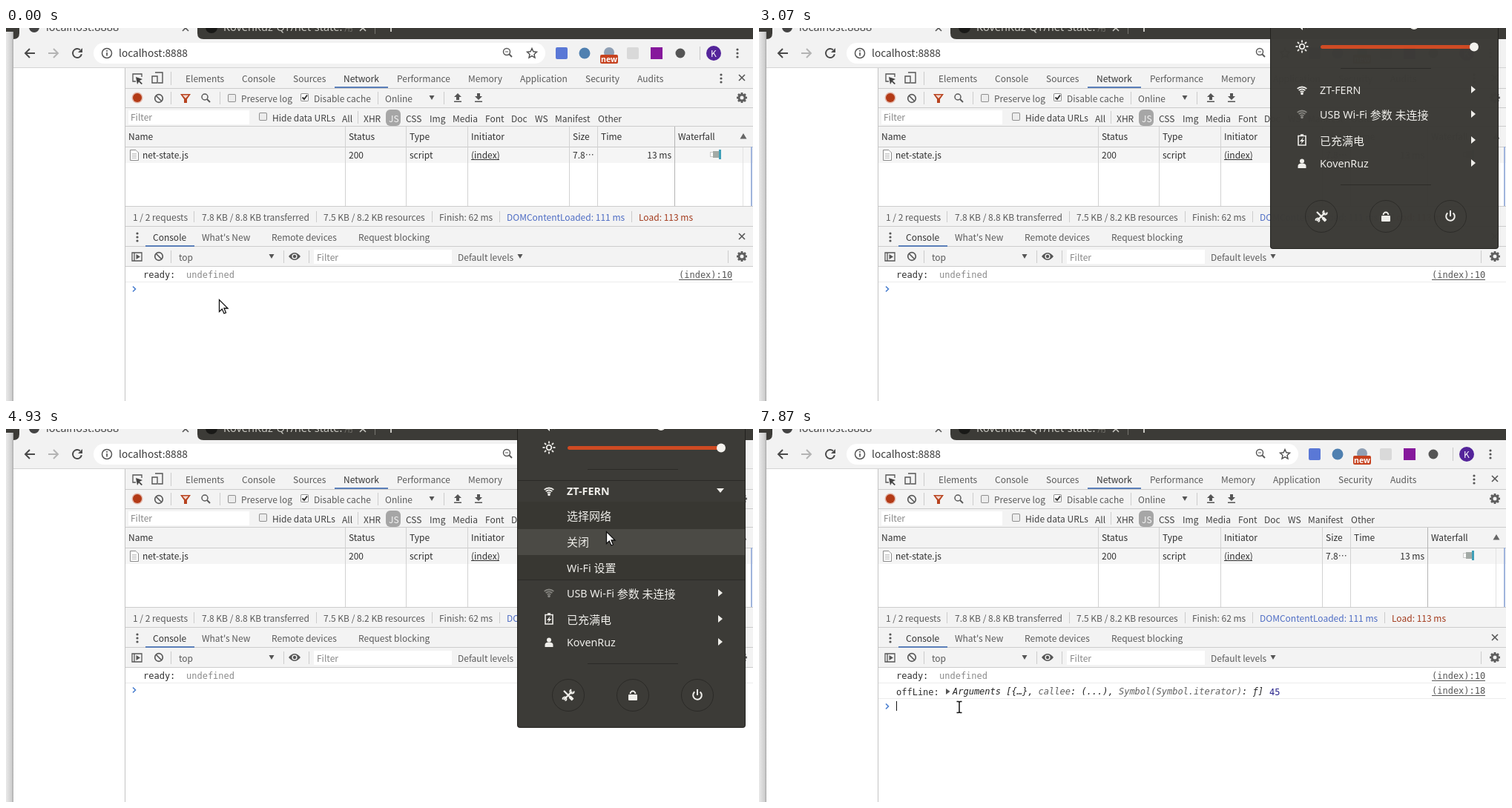
Animation of 1007 by 503 pixels, one loop 8 s. Source, as an HTML page with a canvas:

```html
<!DOCTYPE html>
<html lang="en">
<head>
<meta charset="utf-8">
<title>Network panel</title>
<style>
html, body { margin: 0; width: 100%; height: 100%; overflow: hidden; background: #fff; }
canvas { display: block; }
</style>
</head>
<body>
<canvas id="stage" width="1007" height="503"></canvas>
<script>
const W = 1007, H = 503, LOOP = 8000, TICK = 200 / 3;
const screen = document.getElementById('stage').getContext('2d');
const layer = Object.assign(document.createElement('canvas'), { width: W, height: H });
const menuCtx = layer.getContext('2d');
let c = screen;

const UI = '12px "Noto Sans CJK SC", "Noto Sans CJK JP", "Noto Sans", sans-serif';
const MONO = '12px "DejaVu Sans Mono", monospace';
const CHAR = 7.224;
const GREY = '#5a5a5a', INK = '#303030', BAR = '#f3f3f3', RULE = '#cccccc', DARK = '#3c3b37';
const USER = 'KovenRuz', WIFI = 'ZT-FERN';

// ---- drawing helpers ----
function rect(color, x, y, w, h, r = 0) {
  c.fillStyle = color;
  c.beginPath();
  c.roundRect(x, y, w, h, r);
  c.fill();
}
function disc(color, x, y, r) {
  c.fillStyle = color;
  c.beginPath();
  c.arc(x, y, r, 0, 7);
  c.fill();
}
function ring(color, x, y, r, w = 1.5, from = 0, to = Math.PI * 2) {
  c.strokeStyle = color;
  c.lineWidth = w;
  c.beginPath();
  c.arc(x, y, r, from, to);
  c.stroke();
}
function at(x, y, draw) {
  c.save();
  c.translate(x, y);
  draw();
  c.restore();
}
function fill(color, d, x = 0, y = 0) {
  at(x, y, () => { c.fillStyle = color; c.fill(new Path2D(d)); });
}
function stroke(color, w, d, x = 0, y = 0) {
  at(x, y, () => { c.strokeStyle = color; c.lineWidth = w; c.stroke(new Path2D(d)); });
}
function text(s, x, y, color = GREY, font = UI, align = 'left') {
  c.font = font;
  c.fillStyle = color;
  c.textAlign = align;
  c.fillText(s, x, y);
}
const hline = (y, x = 161, color = RULE) => rect(color, x, y, W - x, 1);
const vline = (x, y, h, color = RULE) => rect(color, x, y, 1, h);

// ---- icons ----
function gear(x, y) {
  ring('#5f5f5f', x, y, 4, 3);
  for (let i = 0; i < 8; i++) at(x, y, () => {
    c.rotate(i * Math.PI / 4);
    rect('#5f5f5f', -1.4, -7, 2.8, 3);
  });
}
function dots(x, y) {
  for (const d of [-5, 0, 5]) disc('#555', x, y + d, 1.6);
}
const cross = (x, y, r = 4, color = '#555') =>
  stroke(color, 1.6, `M${-r} ${-r}L${r} ${r}M${r} ${-r}L${-r} ${r}`, x, y);
const drop = (x, y) => fill('#555', 'M-3.5-3H3.5L0 3Z', x, y);
function lens(x, y, r = 4) {
  ring('#5a5a5a', x - 1, y - 1, r);
  stroke('#5a5a5a', 2, 'M2 2L6 6', x, y);
}
function forbid(x, y) {
  ring('#5a5a5a', x, y, 5.3, 1.7);
  stroke('#5a5a5a', 1.7, 'M-4-4L4 4', x, y);
}
function checkbox(x, y, on) {
  rect('#8f8f8f', x, y, 11, 11, 2);
  rect(on ? '#fff' : '#ececec', x + 1, y + 1, 9, 9, 1);
  if (on) stroke('#333', 2, 'M2.5 5.5L5 8L9 2.5', x, y);
}

// ---- browser window ----
function chrome() {
  rect('#fff', 0, 0, W, H);
  const shade = c.createLinearGradient(0, 0, 10, 0);
  shade.addColorStop(0, '#e9e9e9');
  shade.addColorStop(0.75, '#cfcfcf');
  shade.addColorStop(1, '#a9a9a9');
  rect(shade, 0, 0, 10, H);
  rect(DARK, 0, 0, 10, 5);
  rect('#f2f2f2', 10, 0, W - 10, 53);
  fill(DARK, 'M10 0H18V7Q18 15 10 15Z');
  fill(DARK, 'M258 0H1007V15H266Q258 15 258 7Z');
  hline(53, 10, '#d4d4d4');

  const tabFont = '14.5px "Noto Sans", sans-serif';
  disc('#444', 38, -1, 7);
  text('localhost:8888', 54, 4, '#444', tabFont);
  cross(242, 0);
  disc('#191917', 277, -1, 8);
  text(USER + '-QT/net-state:', 293, 4, '#c9c8c2', tabFont);
  text('用', 456, 4, '#77766f', UI);
  cross(481, 0, 4, '#c9c8c2');
  vline(497, 0, 8, '#77766f');
  rect('#c9c8c2', 518, 0, 2, 5);

  rect('#fff', 118, 20, 609, 28, 14);
  stroke('#4a4a4a', 2, 'M7 0H-6M0-6L-6 0L0 6', 32, 34);
  stroke('#b4b4b4', 2, 'M-7 0H6M0-6L6 0L0 6', 64, 34);
  ring('#4a4a4a', 96, 34, 6, 2, 0.2, 5.4);
  fill('#4a4a4a', 'M7-7V-1H1Z', 96, 34);
  ring('#555', 136, 34, 6.5);
  rect('#555', 135.2, 33, 1.7, 4.5);
  rect('#555', 135.2, 30, 1.7, 1.8);
  text('localhost:8888', 152, 38.5, '#3a3a3a', UI.replace('12px', '13.7px'));
  lens(676, 33, 4.5);
  rect('#5a5a5a', 673, 31.5, 4, 1);
  stroke('#4f4f4f', 1.4, 'M0-6.5L1.9-2.2L6.5-1.8L3 1.4L4 6L0 3.6L-4 6L-3-1.4L-6.5-1.8L-1.9-2.2Z'.replace('-3-1.4', '-3 1.4'), 709, 34);

  rect('#5a78d6', 741, 26, 16, 16, 2);
  disc('#4f80b0', 780, 34, 7.5);
  disc('#8f9fb4', 813, 33, 7);
  rect('#c6421f', 801, 36, 24, 12, 2);
  text('new', 813, 45.5, '#fff', 'bold 10.5px "Noto Sans", sans-serif', 'center');
  rect('#d9d9d9', 837, 26, 16, 16, 2);
  rect('#86189c', 869, 26, 16, 16);
  disc('#555', 909, 34, 6.5);
  vline(935, 25, 18, '#c8c8c8');
  disc('#54249a', 954, 34, 10);
  text(USER[0], 954, 38.5, '#fff', UI, 'center');
  dots(986, 34);
}

// ---- developer tools ----
function labels(y, items, color) {
  for (const [s, x] of items) text(s, x, y, color);
}
function toolbars() {
  vline(160, 54, H - 54, '#c4c4c4');
  rect(BAR, 161, 54, W - 161, 107);
  for (const y of [81, 107, 132, 160]) hline(y);

  stroke('#555', 1.3, 'M-2 4H-6V-6H6V-2', 177, 68);
  fill('#444', 'M-2-2L7 1L3 3L7 7L5.5 8L2 4.5L0 8Z', 177, 68);
  stroke('#555', 1.4, 'M-3-7H7V7H1M-7-2H0V7H-7Z', 204, 67);
  vline(222, 59, 18);
  labels(73, [['Elements', 242], ['Console', 318], ['Sources', 387], ['Performance', 527],
    ['Memory', 623], ['Application', 693], ['Security', 781], ['Audits', 851]]);
  text('Network', 455, 73, '#333');
  rect('#5b7fb9', 443, 79, 72, 2);
  dots(964, 68);
  cross(992, 67);

  disc('#e3b8ac', 177, 94, 7.5);
  disc('#b33a16', 177, 94, 6);
  forbid(206, 95);
  for (const x of [222, 288, 501, 590]) vline(x, 86, 17);
  fill('#b8431f', 'M-7-6H7L2 1V6H-2V1Z', 242, 95);
  fill('#f3d8cf', 'M-4-4.500H4L0 0Z', 242, 95);
  lens(269, 94);
  checkbox(299, 89);
  text('Preserve log', 317, 99.5);
  checkbox(397, 88, true);
  text('Disable cache', 415, 99.5);
  text('Online', 511, 99.5);
  drop(574, 94);
  fill('#555', 'M0-6L5-1H2V3H-2V-1H-5ZM-5 4.5H5V6H-5Z', 609, 94);
  fill('#555', 'M0 3L5-2H2V-6H-2V-2H-5ZM-5 4.5H5V6H-5Z', 637, 94);
  gear(992, 94);

  rect('#fff', 165, 111, 163, 19);
  text('Filter', 168, 125, '#868686');
  checkbox(341, 114);
  rect('#a6a6a6', 512, 110, 20, 22, 6);
  vline(474, 112, 17);
  labels(126.5, [['All', 453], ['XHR', 482], ['CSS', 539], ['Img', 571], ['Media', 602],
    ['Font', 646], ['Doc', 681], ['WS', 713], ['Manifest', 740], ['Other', 798]], '#404040');
  text('Hide data URLs', 359, 125.5, '#404040');
  text('JS', 516, 126.5, '#f4f4f4');
}
function requests() {
  labels(151, [['Name', 165], ['Status', 462], ['Type', 544], ['Initiator', 627],
    ['Size', 764], ['Time', 802], ['Waterfall', 906]], INK);
  fill('#666', 'M-4.500 3.500H4.500L0-4Z', 994, 146);
  rect('#f5f5f5', 161, 161, W - 161, 21);
  for (const x of [457, 539, 622, 759, 797, 901]) vline(x, 133, 107, x > 900 ? '#b4b4b4' : '#d2d2d2');
  vline(993, 161, 79, '#e2e2e2');
  rect('#9fb4dc', 1004, 160, 2, 80);

  rect('#fff', 167.5, 164.5, 11, 14, 1);
  stroke('#8c8c8c', 1, 'M.5.5H8L11.5 4V14.5H.5Z', 167, 164);
  stroke('#c0c0c0', 1, 'M3 5.500H9M3 7.500H9M3 9.500H9M3 11.500H9', 167, 164);
  labels(175.5, [['net-state.js', 184], ['200', 462], ['script', 544], ['(index)', 627], ['7.8⋯', 764]], INK);
  rect(INK, 627, 177, 38, 1);
  text('13 ms', 897, 175.5, INK, UI, 'right');
  rect('#c9c9c9', 949, 167, 9, 7);
  rect('#fff', 950, 168, 3, 5);
  rect('#a3aaa6', 953, 166, 8, 9);
  rect('#3f9fb8', 961, 164, 3, 13);

  rect(BAR, 161, 240, W - 161, 81);
  for (const y of [240, 267, 294, 321]) hline(y);
  labels(260, [['1 / 2 requests', 171], ['7.8 KB / 8.8 KB transferred', 264],
    ['7.5 KB / 8.2 KB resources', 428], ['Finish: 62 ms', 584]]);
  text('DOMContentLoaded: 111 ms', 675, 260, '#4d6cc4');
  text('Load: 113 ms', 853, 260, '#a33a1c');
  for (const x of [253, 418, 574, 665, 843]) vline(x, 247, 15);
}
function drawer(t) {
  dots(177, 282);
  text('Console', 198, 287, '#333');
  rect('#5b7fb9', 188, 293, 66, 2);
  text("What's New", 264, 287);
  text('Remote devices', 358, 287, t > 5660 && t < 5730 ? '#333' : GREY);
  text('Request blocking', 475, 287);
  cross(992, 281);

  stroke('#555', 1.3, 'M-6.500-5.500H6.500V5.500H-6.500ZM-3.500-5V5', 176.5, 308.5);
  fill('#555', 'M-1-3.500V3.500L4.500 0Z', 176.5, 308.5);
  forbid(206, 308);
  for (const x of [222, 374, 408, 973]) vline(x, 300, 17);
  text('top', 233, 314);
  drop(358, 308);
  fill('#555', 'M-8 0Q0-10 8 0Q0 10-8 0Z', 389, 308);
  disc(BAR, 389, 308, 3.6);
  disc('#555', 389, 308, 2.2);
  rect('#fff', 415, 299, 186, 19);
  text('Filter', 419, 313.5, '#868686');
  text('Default levels', 609, 313.5);
  drop(693, 308);
  gear(992, 308);
}
function logLink(s, y) {
  text(s, 907, y, '#555', MONO);
  rect('#555', 907, y + 2, 72, 1);
}
function log(t) {
  const offline = t > 5330;
  text('ready:', 185, 337, INK, MONO);
  text('undefined', 243, 337, '#8a8a8a', MONO);
  logLink('(index):10', 337);
  hline(342, 161, '#ececec');
  if (offline) {
    text('offLine:', 185, 358.5, INK, MONO);
    fill('#555', 'M0-4V4L5.500 0Z', 252, 354);
    let x = 261;
    const parts = ['Arguments [{…}, ', 'callee', ': (...), ', 'Symbol(Symbol.iterator)', ': ƒ]'];
    parts.forEach((s, i) => {
      text(s, x, 358, i % 2 ? '#606060' : '#222', 'italic ' + MONO);
      x += s.length * CHAR;
    });
    text('45', 688, 358.5, '#28248c', MONO);
    logLink('(index):18', 357);
    hline(363, 161, '#ececec');
  }
  const y = offline ? 374 : 352;
  stroke('#4a7fd0', 1.6, 'M-2-3.500L1.500 0L-2 3.500', 173, y);
  const caret = (t > 395 && t < 860) || (t > 6795 && t < 7330) || t > 7860;
  if (caret) rect('#111', 185, y - 7, 1, 13);

  if (t > 5330 && t < 5460) {
    rect('#bdbdbd', 692, 191, 306, 26, 3);
    rect('#f6f6f6', 693, 192, 304, 24, 2);
    text('7.8 KB transferred over network, resource size: 7.5 KB', 701, 208.5);
  }
}

// ---- system menu ----
const WHITE = '#efeeea', LINE = '#2b2a27', HOVER = '#4b4a45';

function label(s, y, bold, color = WHITE) {
  let x = 756;
  for (const part of s.match(/[\u4e00-\u9fff]+|[^\u4e00-\u9fff]+/g)) {
    const han = part > '\u4e00';
    const font = (bold ? 'bold ' : '') + (han ? UI.replace('12px', '15px') : '14.3px "Noto Sans", sans-serif');
    text(part, x, y + (han ? 5.5 : 5), color, font);
    x += c.measureText(part).width;
  }
}
function wifi(y, color) {
  for (const r of [3.5, 6.5, 9.5]) ring(color, 732, y + 5, r, 1.8, -2.3, -0.84);
  disc(color, 732, y + 4.5, 1.8);
}
function arrow(y, turn = 0) {
  at(963, y - 1, () => {
    c.rotate(turn * Math.PI / 2);
    fill(WHITE, 'M-3-5L3 0L-3 5Z');
  });
}
function slider(y, knob) {
  rect(LINE, 757, y - 2.5, 213, 5, 2.5);
  rect('#cf4a22', 757, y - 2.5, knob - 757, 5, 2.5);
  disc('#f4f2ee', knob, y, 6);
}
function airplane(y) {
  fill(WHITE, 'M8 0Q8-1.500 5-1.500H2L-2-7H-4L-2-1.500H-5L-7-4H-8L-7 0L-8 4H-7L-5 1.500H-2L-4 7H-2L2 1.500H5Q8 1.500 8 0Z', 732, y);
}
function battery(y) {
  stroke(WHITE, 1.6, 'M-5-5.500H5V7H-5ZM-2-7H2', 732, y);
  fill(WHITE, 'M2-4L-3 2H0L-2 6L3.500 0H.500Z', 732, y);
}
function person(y) {
  disc(WHITE, 732, y - 3.5, 3);
  fill(WHITE, 'M-5.500 6V3Q-5.500-.5 0-.5Q5.500-.5 5.500 3V6Z', 732, y);
}
function buttons(y) {
  for (const x of [758, 845, 932]) ring(LINE, x, y, 21.5, 1);
  stroke(WHITE, 2.4, 'M-6 6L5-5M-6-6L6 6', 758, y);
  ring(WHITE, 763, y - 5, 2.6, 2, -0.2, 4.4);
  ring(WHITE, 753, y + 5, 2.4, 1.8, 2.8, 7.6);
  stroke(WHITE, 4, 'M2 2L6 6', 758, y);
  rect(WHITE, 839, y - 1, 12, 8, 1);
  ring(WHITE, 845, y - 2, 3.4, 2, Math.PI, 0);
  ring(WHITE, 932, y, 5.8, 2, -0.9, Math.PI + 0.9);
  rect(WHITE, 931, y - 8, 2, 8);
}
function menu(off, open, hover) {
  const h = Math.round(105 * open), head = off ? 88 : 84, top = head + 14;
  const rows = [['USB Wi-Fi 参数 ' + (off ? '已关闭' : '未连接'), y => wifi(y, '#85847f')]];
  if (off) rows.push(['飞行模式已开启', airplane]);
  rows.push(['已充满电', battery]);
  const user = head + 33 + h + rows.length * 35 - 4;

  rect('#22211e', 689, -30, 308, user + 145, 4);
  rect(DARK, 690, -30, 306, user + 144, 3);
  fill(WHITE, 'M-7-2.500H-4L1-7V7L-4 2.500H-7Z', 732, -4);
  stroke('#85847f', 1.6, 'M3-3L8 3M8-3L3 3', 732, -3);
  slider(-4, 883);
  ring(WHITE, 732, 25, 3.3, 1.8);
  for (let i = 0; i < 8; i++) at(732, 25, () => {
    c.rotate(i * Math.PI / 4);
    rect(WHITE, -0.9, -8.5, 1.8, 3);
  });
  slider(25.5, 964);
  rect(LINE, 784, 54, 122, 1);

  if (hover === 0) rect(HOVER, 690, 69, 306, 29);
  if (h) {
    rect(LINE, 690, top - 29, 306, 1);
    c.save();
    c.beginPath();
    c.rect(690, top, 306, h);
    c.clip();
    rect('#383732', 690, top, 306, h);
    if (hover > 0) rect(HOVER, 690, top + 2 + 35 * (hover - 1), 306, 35);
    ['选择网络', off ? '开启' : '关闭', 'Wi-Fi 设置'].forEach((s, i) => label(s, head + 33.5 + 35 * i));
    c.restore();
    rect(LINE, 690, top + h, 306, 1);
  }
  wifi(head, off ? '#85847f' : WHITE);
  label(off ? 'PCI Wi-Fi 参数 已关闭' : WIFI, head, h > 0);
  arrow(head, open);
  rows.forEach(([s, icon], i) => {
    const y = head + 33 + h + 35 * i;
    icon(y - 1);
    label(s, y);
    arrow(y);
  });
  person(user);
  label(USER, user);
  arrow(user);
  rect(LINE, 784, user + 28, 122, 1);
  buttons(user + 71);
}

// ---- motion ----
const ease = (t, start, span) => {
  const p = Math.min(1, Math.max(0, (t - start) / span));
  return 1 - (1 - p) ** 2;
};
function systemMenu(t) {
  if (t < 2930 || t > 5460) return;
  const shown = ease(t, 2910, 175), gone = ease(t, 5275, 150);
  const hover = t < 3660 || gone ? -1 : t < 4390 ? 0 : t < 4860 ? 1 : 2;
  c = menuCtx;
  c.clearRect(0, 0, W, H);
  at(0, Math.round(12 * (shown - 1 + gone)), () => menu(gone > 0, ease(t, 4050, 250), hover));
  c = screen;
  c.globalAlpha = shown * (1 - gone);
  c.drawImage(layer, 0, 0);
  c.globalAlpha = 1;
}

// time, x, y of the pointer tip
const path = [
  [0, 287, 366], [800, 287, 366], [867, 288, 365], [1000, 288, 365], [1067, 289, 363],
  [1200, 289, 363], [1400, 708, 88], [3400, 872, -30], [3467, 871, 0], [3533, 864, 62], [3600, 864, 62],
  [3667, 860, 68], [3933, 846, 80], [4267, 846, 80], [4533, 828, 112], [4600, 828, 112],
  [5067, 802, 148], [5200, 802, 148], [5333, 800, 170], [5533, 448, 269], [5600, 448, 269],
  [5733, 432, 269], [5800, 432, 269], [5867, 432, 265], [6000, 432, 265], [6467, 278, 367],
  [6533, 276, 375], [6600, 276, 375], [6933, 270, 374], [7400, 270, 374], [7467, 270, 375], [8000, 270, 375]
];
function pointer(t) {
  if (t > 1460 && t < 3460) return;
  const i = Math.max(1, path.findIndex(k => k[0] >= t));
  const [t0, x0, y0] = path[i - 1], [t1, x1, y1] = path[i];
  const p = (t - t0) / (t1 - t0);
  const x = Math.round(x0 + (x1 - x0) * p), y = Math.round(y0 + (y1 - y0) * p);
  if (t > 6530) {
    const beam = 'M-3.500-7.500H-1L0-6.500L1-7.500H3.500M0-7V7M-3.500 7.500H-1L0 6.500L1 7.500H3.500';
    stroke('#fff', 3, beam, x, y);
    stroke('#111', 1.5, beam, x, y);
  } else {
    const tip = 'M.5.5V16.500L4.300 13L7 19L9.500 18L7 12H12Z';
    fill('#fff', tip, x, y);
    stroke('#111', 1.3, tip, x, y);
  }
}

function draw(now) {
  const t = Math.floor((now % LOOP + 4) / TICK) * TICK % LOOP;
  chrome();
  toolbars();
  requests();
  drawer(t);
  log(t);
  systemMenu(t);
  pointer(t);
}
const start = performance.now();
function loop() {
  draw(performance.now() - start);
  requestAnimationFrame(loop);
}
loop();
</script>
</body>
</html>
```
